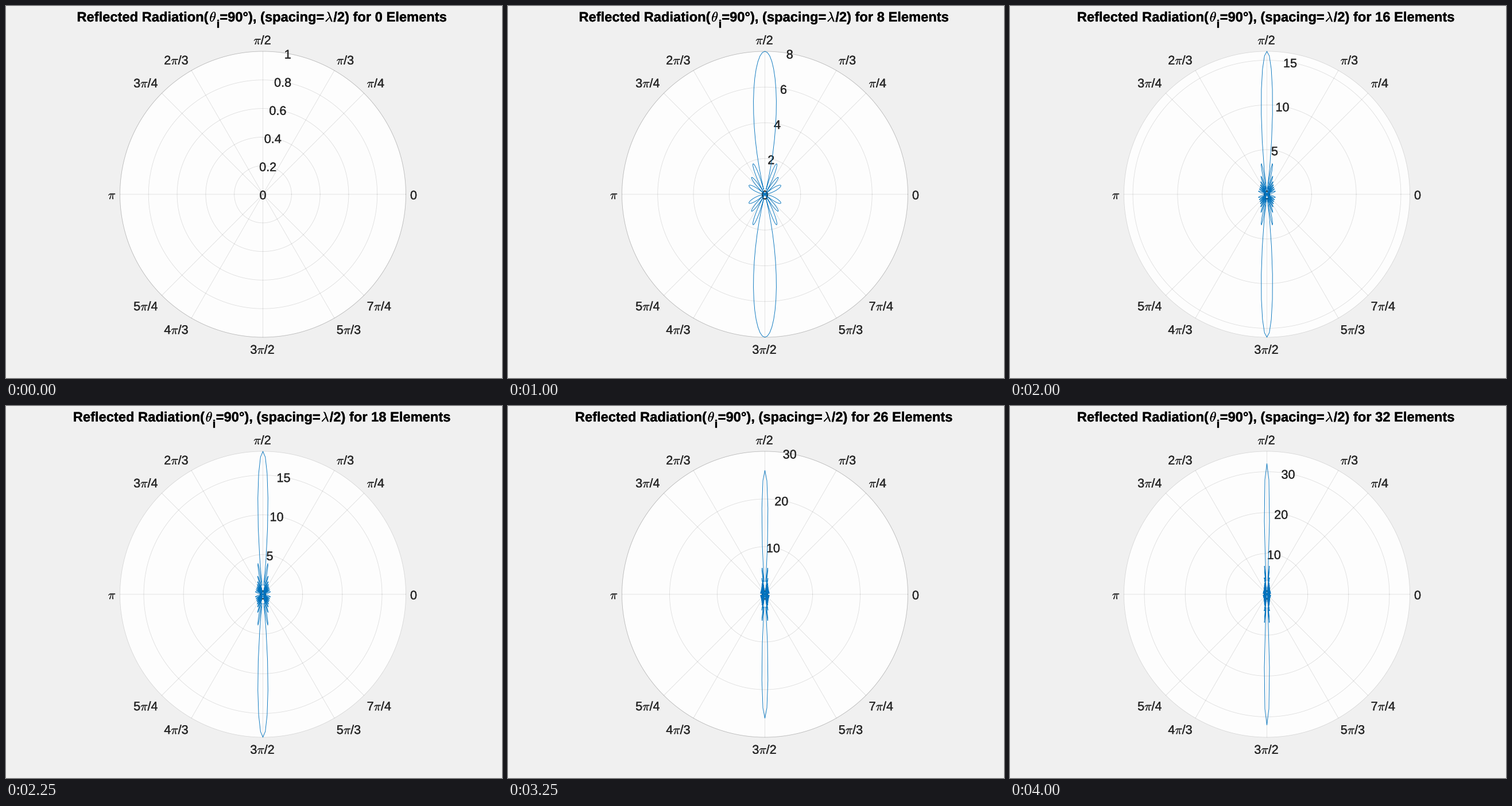
A matplotlib script that plays this animation: 864 px wide and 648 px high, repeating every 4250 ms.

```python
import numpy as np
import matplotlib.pyplot as plt
from matplotlib.animation import FuncAnimation
from matplotlib.patches import Circle, Polygon
from matplotlib.patheffects import withStroke

plt.rcParams.update({
    "font.family": "Liberation Sans",
    "mathtext.fontset": "cm",
    "text.hinting": "none",
    "path.simplify": False,
    "path.snap": False,
    "toolbar": "None",
})

W, H = 864, 648
CX, CY, R = 447.5, 328, 249
INK, BLUE, ICON = "#262626", "#0072bd", "#949494"
LABEL_SIZE, TITLE_SIZE = 21.6, 23.7
FRAMES, LOOP_MS = 17, 4250

fig = plt.figure(figsize=(W / 72, H / 72), dpi=72, facecolor="#f0f0f0")
ax = fig.add_axes([0, 0, 1, 1])
ax.set(xlim=(0, W), ylim=(H, 0))
ax.axis("off")


def polar(theta, r):
    """Polar coordinates, r as a fraction of the rim, to stage pixels."""
    return CX + R * r * np.cos(theta), CY - R * r * np.sin(theta)


def write(x, y, s, size, color, ha, weight="normal"):
    """Text on a baseline, with slightly heavier strokes."""
    return ax.text(x, y, s, size=size, color=color, ha=ha, va="baseline",
                   weight=weight, zorder=3,
                   path_effects=[withStroke(linewidth=0.3, foreground=color)])


def label(x, y, s):
    """Tick label centred on (x, y)."""
    return write(x, y + 7.8, s, LABEL_SIZE, INK, "center")


def line(x, y, color=INK, lw=0.8, alpha=0.15, z=2):
    return ax.plot(x, y, color=color, lw=lw, alpha=alpha, zorder=z)[0]


def radial_axis(n):
    """Radial limit and tick values for n elements."""
    limit = max(n, 1) if n <= 20 else 5 * int(np.ceil(n / 5))
    steps = ((1, 0.2), (2, 0.5), (4, 1), (10, 2), (20, 5), (35, 10))
    step = next(s for cap, s in steps if limit <= cap)
    return limit, step * np.arange(int(limit / step + 1e-9) + 1)


def array_factor(n, theta):
    k = np.arange(n)[:, None]
    return np.abs(np.exp(1j * np.pi * k * np.cos(theta)).sum(axis=0))


# Disc, spokes and rim
turn = np.linspace(0, 2 * np.pi, 361)
ax.add_patch(Circle((CX, CY), R, fc="#fdfdfd", ec="none", zorder=1))
for deg in (0, 45, 60, 90, 120, 135, 180, 225, 240, 270, 300, 315):
    line(*polar(np.radians(deg), np.array([0, 1])))
line(*polar(turn, 1), alpha=0.15)
rim_tick = line(*polar(turn, 1), alpha=0.17)
rings = line([], [])

for x, y, s in (
    (710, 329, "0"), (644.5, 134, r"$\pi$/4"), (591.5, 94, r"$\pi$/3"),
    (447, 59, r"$\pi$/2"), (297, 94, r"2$\pi$/3"), (244, 134, r"3$\pi$/4"),
    (185, 328.5, r"$\pi$"), (244, 522.5, r"5$\pi$/4"),
    (297, 563.5, r"4$\pi$/3"), (447, 598, r"3$\pi$/2"),
    (597.5, 563.5, r"5$\pi$/3"), (650.5, 522.5, r"7$\pi$/4"),
):
    label(x, y, s)

tick_labels = [label(CX, CY, "") for _ in range(6)]
curve = line([], [], BLUE, 0.9, 1, 4)

# Title pieces: x for a one-digit count, baseline, size, weight, text
title = [
    (write(x, y, s, size, "black", "left", weight), x)
    for x, y, size, weight, s in (
        (123.4, 27, TITLE_SIZE, "bold", "Reflected Radiation("),
        (354.3, 27, TITLE_SIZE, "normal", r"$\theta$"),
        (366.5, 38, 20, "bold", "i"),
        (372.3, 27, TITLE_SIZE, "bold", "=90°), (spacing="),
        (555.5, 27, TITLE_SIZE, "normal", r"$\lambda$"),
        (570.3, 27, TITLE_SIZE, "bold", ""),
    )
]

# Toolbar: share arrow over a tray, and a note with a pointer
icons = [
    line([638.7, 638.7, 656.5, 656.5], [63, 71.7, 71.7, 67.5], ICON, 1.5, 1),
    line([642, 644, 650, 650, 657.5, 650, 650, 645, 642],
         [67, 59, 56, 51.5, 58, 65, 61, 62, 67], ICON, 1.4, 1),
    ax.add_patch(Polygon([(662, 67.5), (662, 73), (656.5, 73)],
                         fc="#808080", ec="none")),
    line([674, 692.5, 692.5, 674, 674, 670, 674, 674],
         [50, 50, 73.5, 73.5, 65.5, 62, 58.5, 50], ICON, 1.5, 1),
    line([678, 688.5], [59.3, 59.3], ICON, 1.5, 1),
    line([678, 688.5], [64.5, 64.5], ICON, 1.5, 1),
]
icon_alpha = {2: 1, 4: 1, 6: 0.5}

theta = np.radians(np.arange(361))


def update(i):
    n = 2 * i
    limit, ticks = radial_axis(n)

    shift = 0.278 * TITLE_SIZE * (len(str(n)) - 1)
    for text, x in title:
        text.set_x(x - shift)
    title[-1][0].set_text(f"/2) for {n} Elements")

    inner = ticks[(ticks > 0) & (ticks < limit - 1e-6)] / limit
    gap = np.append(turn, np.nan)
    rings.set_data(*polar(np.tile(gap, len(inner)),
                          np.repeat(inner, len(gap))))
    rim_tick.set_visible(bool(np.isclose(ticks[-1], limit)))

    for k, text in enumerate(tick_labels):
        text.set_visible(k < len(ticks))
        if k < len(ticks):
            x, y = polar(np.radians(80), ticks[k] / limit)
            text.set_position((x, y + 8.7))
            text.set_text(f"{ticks[k]:g}")

    if n:
        curve.set_data(*polar(theta, array_factor(n, theta) / limit))
    else:
        curve.set_data([], [])

    for icon in icons:
        icon.set_alpha(icon_alpha.get(n, 0))
    return []


anim = FuncAnimation(fig, update, frames=FRAMES, interval=LOOP_MS / FRAMES,
                     init_func=lambda: update(0), repeat=True, repeat_delay=0)
plt.show()
```
